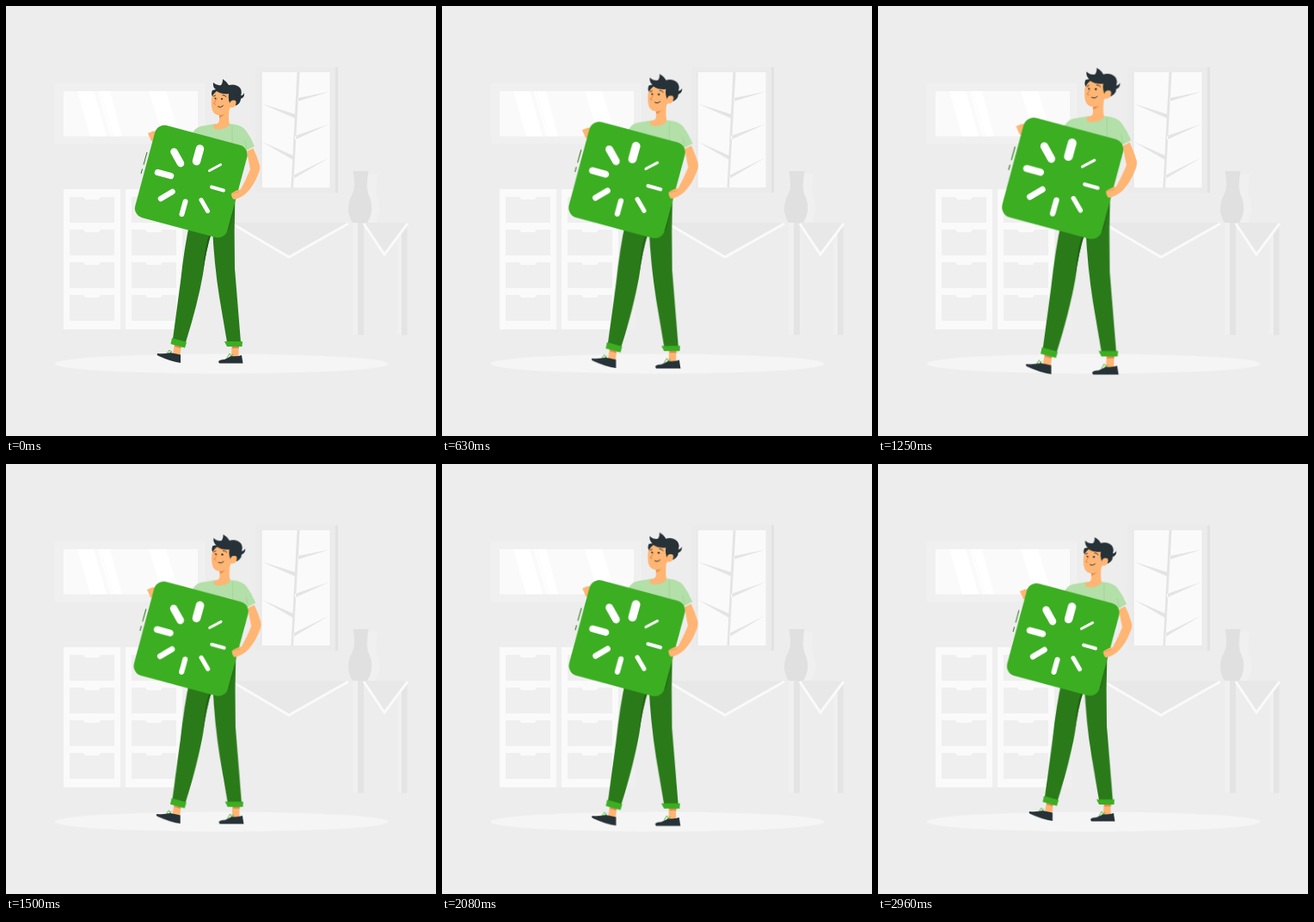
These frames come from a looping animation (500x500 px, 3000 ms). An HTML page:

```html
<!DOCTYPE html>
<html lang="en">
<head>
<meta charset="utf-8">
<title>Man carrying a loading card</title>
<style>
html, body { margin: 0; width: 100%; height: 100%; overflow: hidden; background: #ededed; }
svg { display: block; width: 100vw; height: 100vh; }
.man { transform-origin: 222.5px 250.5px; animation: pulse 3s linear infinite; }
@keyframes pulse {
  0% { transform: scale(1); }
  12.5% { transform: scale(1.1); }
  20.83% { transform: scale(1.038); }
  26.4% { transform: scale(1); }
  34.72% { transform: scale(1.055); }
  38.9% { transform: scale(1.1); }
  50% { transform: scale(1.019); }
  52.8% { transform: scale(1); }
  62.5% { transform: scale(1.1); }
  69.44% { transform: scale(1.032); }
  73.6% { transform: scale(1); }
  84.72% { transform: scale(1.066); }
  87.5% { transform: scale(1.1); }
  90.28% { transform: scale(1.067); }
  98.6%, 100% { transform: scale(1); }
}
.skin { fill: #ffb573; }
.ink { fill: #263238; }
.green { fill: #3cae22; }
.dark { fill: #2a7a1a; }
.line { fill: none; stroke: #263238; stroke-linecap: round; }
.rays { stroke: #fff; stroke-linecap: round; }
</style>
</head>
<body>
<svg viewBox="0 0 500 500">
  <defs>
    <path id="drawer" d="M0 0H16L18 3H34L36 0H52V30H0Z" fill="#efefef"/>
    <g id="column">
      <rect width="66" height="163" fill="#fafafa"/>
      <use href="#drawer" x="7" y="9"/>
      <use href="#drawer" x="7" y="47"/>
      <use href="#drawer" x="7" y="85"/>
      <use href="#drawer" x="7" y="123"/>
    </g>
  </defs>

  <rect width="500" height="500" fill="#ededed"/>
  <ellipse cx="250.500" cy="416" rx="194" ry="11.500" fill="#f5f5f5"/>

  <!-- window -->
  <path d="M57 90H233V160H57Z" fill="#ebebeb"/>
  <path d="M57 90H232V160H57Z" fill="#f0f0f0"/>
  <path d="M67 99H223V151.500H67Z" fill="#fafafa"/>
  <path d="M83 99H102L117 151.500H98ZM107 99H109L124 151.500H122ZM110 99H121L135 151.500H125ZM166 99H186L202 151.500H182Z" fill="#fff"/>

  <!-- framed print -->
  <path d="M383 71H386V217H383Z" fill="#e2e2e2"/>
  <path d="M290 71H383V217H290Z" fill="#ebebeb"/>
  <path d="M296 77H376.500V211H296Z" fill="#fafafa"/>
  <path d="M296 77H297.500V211H296Z" fill="#e6e6e6"/>
  <path d="M338.500 77H341.500L334 211H331.500ZM297 113.500L337 126V131ZM376.500 99.500L339 107V111ZM297 157.500L334 174V179ZM376.500 137L336 151V155.500ZM376.500 176L334 197V201Z" fill="#e4e4e4"/>

  <!-- drawers -->
  <path d="M133 213H225V376H133Z" fill="#efefef"/>
  <use href="#column" x="67" y="213"/>
  <use href="#column" x="139" y="213"/>

  <!-- table and vase -->
  <path d="M403 252H409V382H403ZM455 252H460V382H455Z" fill="#f0f0f0"/>
  <path d="M409 252H416V382.500H409ZM460 252H466.500V382.500H460Z" fill="#e4e4e4"/>
  <path d="M262 252H398L329 292ZM416 252H468L440 289Z" fill="#e8e8e8"/>
  <path d="M262 252.500L329 292L398 253M416 253L440 289L467 253" fill="none" stroke="#fafafa" stroke-width="3"/>
  <path d="M421 195H432Q428 214 433 226Q437 240 429 252H421Z" fill="#f0f0f0"/>
  <path d="M403.500 192H421.500Q418 210 421 218Q430 236 420 252H403Q393 236 403 218Q407 210 403.500 192Z" fill="#e0e0e0"/>

  <g class="man">
    <!-- legs -->
    <path class="dark" d="M214 250Q207 282 203 320L194 387L209 391Q223 346 229 312Q232 286 239 262Z"/>
    <path d="M238 262Q231 276 229 310Q233 282 239 264Z" fill="#1f6014"/>
    <path class="dark" d="M240 258Q242 300 248 338L257 391H273L266 305Q265 262 266.500 218Z"/>
    <path d="M266 232L252 268L259 260Z" fill="#226717"/>
    <path class="skin" d="M196 392L204 394L202.500 406L194 405ZM262.500 394H270.500V408H262Z"/>
    <path d="M196 394L204 396L203 398L196 396ZM263 396H271V398H263Z" fill="#d98a52"/>
    <path class="green" d="M193 386L210 391L208 397.500L191.500 393ZM254 390H275L274.500 396H257Z"/>
    <path class="ink" d="M176 404Q184 405 191 403L203 405.500V415Q193 414 176.500 406.500Q175 405 176 404ZM247 413.500Q248 411 254 411L262 407Q269 408 274 406L275.500 415.500H248Z"/>
    <path d="M187 404L190 400L192 403M190 404L193 401M257 409L260 404L262 407M260 408L264 405" fill="none" stroke="#3cae22" stroke-width=".8"/>

    <!-- torso and head -->
    <path class="skin" d="M180 146L171 145.500L165 148L169 157H178Z"/>
    <path d="M216 150Q219 142 226 140L243 137H262Q274 138 279 145Q285 153 289 163L278 169L262 172H216Z" fill="#b3dfa8"/>
    <path d="M263 139V164M278 156L280 166" fill="none" stroke="#9fd392" stroke-width=".7"/>
    <path class="skin" d="M248 124L260 117Q258 130 260 138Q254 145 243 143Q239 141 242 138Q248 137 248 133Z"/>
    <path d="M248 126Q253 126 256 122Q254 128 248 130Z" fill="#e58f4e"/>
    <path class="skin" d="M241 99Q238 108 239 117Q240 126 247 127Q256 128 261 118Q267 119 268 112Q268 106 262 107L260 96Z"/>
    <path class="ink" d="M240 105Q238 102 240 98L244 97Q240 94 241 89Q245 93 250 92Q252 90 252 85Q257 88 259 92Q267 90 272 95Q275 99 273 104Q276 104 277 101Q278 106 273 108Q273 113 267 116Q267 110 263 110L261 115Q258 109 259 102Q251 103 245 99Q242 101 240 105Z"/>
    <path class="skin" d="M260 113Q262 108 267 110Q269 114 264 118L260 118Z"/>
    <circle class="ink" cx="251" cy="108" r="1.100"/>
    <circle class="ink" cx="243.500" cy="107.500" r="1"/>
    <path class="line" stroke-width=".9" d="M252 103.500Q254 103 256 105.500M241.500 105L243.500 104M246.500 117Q250 119 252.500 116"/>
    <path d="M245.500 107Q243 112 241.500 113.500L244 114.500" fill="none" stroke="#e07f3c" stroke-width=".8"/>

    <!-- card -->
    <rect class="green" x="-55.500" y="-55.500" width="111" height="111" rx="11.500" transform="translate(215.300 204) rotate(15)"/>
    <g class="rays">
      <path stroke-width="8.500" d="M195.500 169.500L203 183"/>
      <path stroke-width="9.500" d="M225.500 166L221.500 180.500"/>
      <path stroke-width="3" d="M236.500 191.500L249.500 184.500"/>
      <path stroke-width="4" d="M239 210.500L253 214.500"/>
      <path stroke-width="5" d="M227 225.500L234.500 238.500"/>
      <path stroke-width="6" d="M208.500 227.500L204.500 242"/>
      <path stroke-width="6.500" d="M180 224L193.500 216"/>
      <path stroke-width="7.500" d="M176.500 193.500L191.500 197.500"/>
    </g>
    <path d="M164 170L160 184.500M158.500 189.500L157 195" fill="none" stroke="#2a7a1a"/>

    <!-- near arm -->
    <path class="skin" d="M280 169L287.500 165.500Q292 175 295 185Q296 190 293 196Q288 209 280 217Q274 223 265 225Q262 223 262 218Q267 214 273 213Q279 202 284 190Z"/>
    <path d="M264 218Q268 216 271 216" fill="none" stroke="#e58f4e" stroke-width=".6"/>
  </g>
</svg>
</body>
</html>
```
